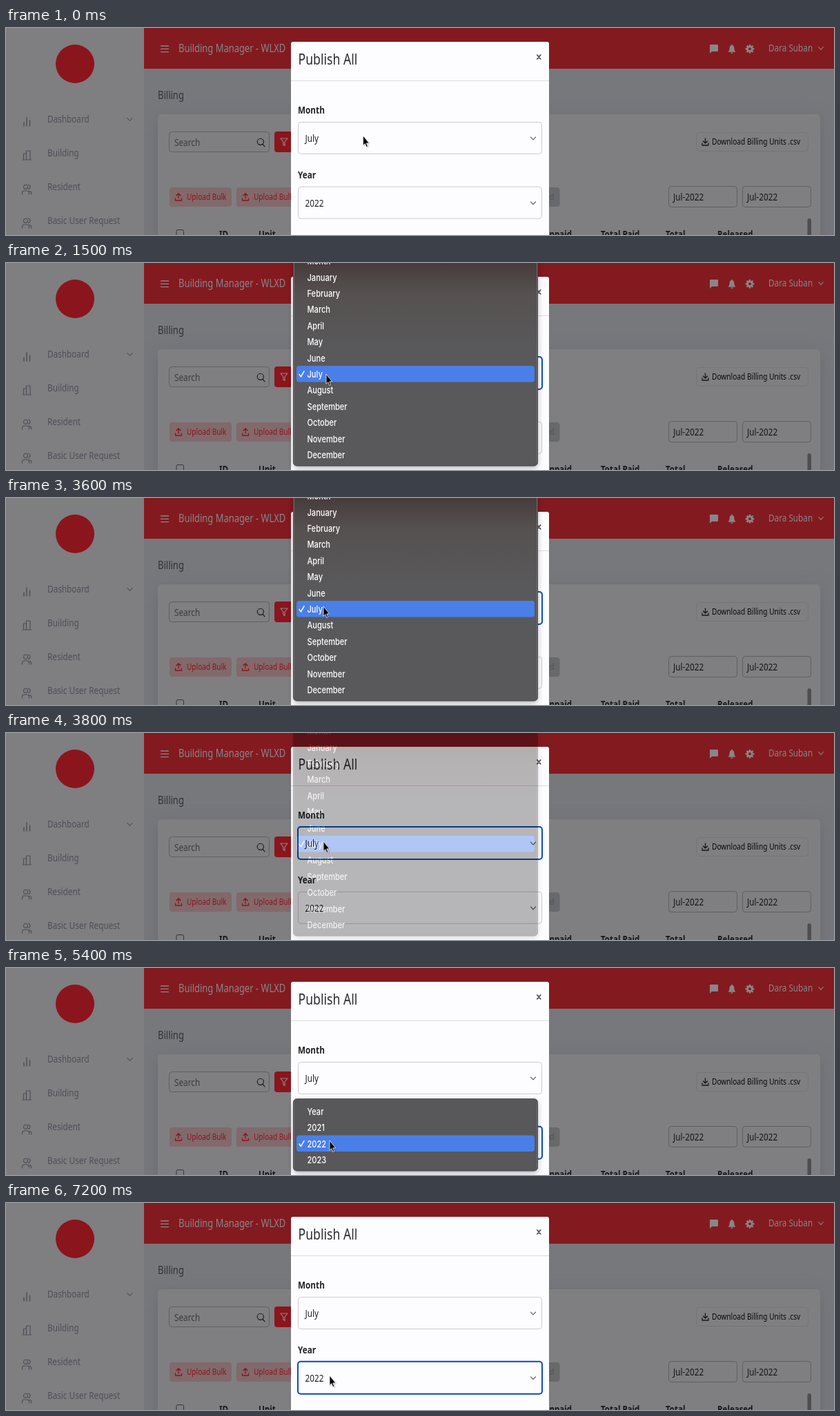
Animation of 1200 by 300 pixels, one loop 8000 ms. Source, as an HTML page:

```html
<!DOCTYPE html>
<html lang="en">
<head>
<meta charset="utf-8">
<title>Publish billing</title>
<style>
html, body { margin: 0; width: 100%; height: 100%; overflow: hidden; background: #7f7e81; }
svg { display: block; width: 100vw; height: 100vh; }
text { font-family: "Noto Sans", "Open Sans", sans-serif; white-space: pre; }
.labels text { font-family: Inter, Roboto, sans-serif; font-weight: 500; }
.line { fill: none; stroke-linecap: round; stroke-linejoin: round; }
/* a closing menu tints what lies below it */
.closing .back { mix-blend-mode: multiply; }
.closing .labels { mix-blend-mode: overlay; }
</style>
</head>
<body>
<svg id="stage" viewBox="0 0 1200 300" preserveAspectRatio="none">
  <defs>
    <linearGradient id="menuFill" gradientUnits="userSpaceOnUse" x1="0" y1="0" x2="0" y2="130">
      <stop offset="0" stop-color="#463c3b"/>
      <stop offset=".35" stop-color="#565151"/>
      <stop offset="1" stop-color="#59595b"/>
    </linearGradient>
    <filter id="soft" x="-10%" y="-30%" width="120%" height="160%"><feGaussianBlur stdDeviation="12"/></filter>
    <filter id="shade" x="-10%" y="-30%" width="120%" height="160%"><feGaussianBlur stdDeviation="5"/></filter>
    <filter id="dim" x="-40%" y="-40%" width="200%" height="200%"><feGaussianBlur stdDeviation="1"/></filter>
  </defs>
  <g id="page"></g>
  <g id="modal"></g>
  <g id="months"></g>
  <g id="years"></g>
  <g id="cursor">
    <path d="M.8 1.5V15.5L4 12.6 6 17.6 8.2 16.6 6.2 11.8H10Z" opacity=".3" filter="url(#dim)"/>
    <path d="M0 0V14.4L2.8 11.6 4.8 16.6 6.8 15.7 4.9 10.9H8.8Z" fill="#000" stroke="#fff" stroke-width=".8" stroke-linejoin="round"/>
  </g>
</svg>
<script>
const SQUEEZE = 0.84;   // the whole screen is narrowed by this ratio
const RED = '#8b151c', BAR = '#831a20', WHITE = '#7f7e81', LIGHT = '#898688';
const INK = '#16171a', MUTED = '#4e5059', PAPER = '#fdfcfe', BLUE = '#0f4fb3';
const LOOP = 8000, STEP = 100;
const ROW = 23.4, FIRST = 25.5;

const $ = id => document.getElementById(id);

const text = (x, y, str, size, fill, extra = '') =>
  `<text transform="translate(${x} ${y}) scale(${SQUEEZE} 1)" font-size="${size}" fill="${fill}" ${extra}>${str}</text>`;
const rect = (x, y, w, h, fill, r = 0, extra = '') =>
  `<rect x="${x}" y="${y}" width="${w}" height="${h}" rx="${r}" fill="${fill}" ${extra}/>`;
const box = (x, y, w, h, stroke, r = 4, fill = 'none') =>
  rect(x, y, w, h, fill, r, `stroke="${stroke}"`);
const line = (d, color, width = 1.2) =>
  `<path class="line" d="${d}" stroke="${color}" stroke-width="${width}"/>`;
const chevron = (x, y, color) => line(`M${x - 3.5} ${y - 1.8}l3.5 3.8 3.5-3.8`, color, 1.1);
const bold = 'font-weight="700"';
const endBold = bold + ' text-anchor="end"';

const people = y => line(
  `M23.5 ${y + 7}v-2q0-3 3-3h4q3 0 3 3v2M34 ${y + 2.3}q2.6.5 2.6 3v1.7M32.5 ${y - 7}q2.6.8 2.6 3.2t-2.6 3.2` +
  `M25.6 ${y - 3.8}a2.9 3.2 0 1 0 5.8 0a2.9 3.2 0 1 0-5.8 0`, MUTED);

const transfer = (x, y, color, up) => line(
  `M${x - 4.5} ${y + 2}v3h9v-3M${x} ${y + 2}v-7` +
  (up ? `M${x - 3} ${y - 2.2}l3-3 3 3` : `M${x - 3} ${y - 1}l3 3 3-3`), color, 1.3);

function gear(cx, cy) {
  let teeth = '';
  for (let i = 0; i < 8; i++)
    teeth += `<rect x="-1.2" y="-6.4" width="2.4" height="4" transform="translate(${cx} ${cy}) rotate(${i * 45})" fill="${LIGHT}"/>`;
  return teeth + `<circle cx="${cx}" cy="${cy}" r="3.4" fill="none" stroke="${LIGHT}" stroke-width="2.8"/>`;
}

function sidebar() {
  return rect(0, 0, 200, 300, WHITE) +
    `<circle cx="100" cy="52" r="28" fill="${RED}"/>` +
    line('M26 142v-5M30 142v-12M34.5 142v-8', MUTED, 1.5) +
    line('M24 191h12.5M25.5 191v-9h4M29.5 191v-13h5.5v13', MUTED) +
    people(234) + people(283) + chevron(179.5, 132.5, MUTED) +
    ['Dashboard', 'Building', 'Resident', 'Basic User Request']
      .map((s, i) => text(60, 137.3 + i * 48.9, s, 14, MUTED)).join('');
}

function header() {
  return rect(200, 0, 1000, 59, BAR) +
    line('M224.5 26h11M224.5 30.3h11M224.5 34.6h11', LIGHT, 1.3) +
    text(250, 34.8, 'Building Manager - WLXD', 15.4, LIGHT) +
    `<path d="M1021 24h10q1 0 1 1v8q0 1-1 1h-8l-3 3V25q0-1 1-1Z" fill="${LIGHT}"/>` +
    `<path d="M1047 34q1.7-1.6 1.7-5.2 0-3.2 2.6-3.8v-1.3h1.4V25q2.6.6 2.6 3.8 0 3.6 1.7 5.2v.8h-10ZM1050.3 35.6h3.4q-.3 1.7-1.7 1.7t-1.7-1.7Z" fill="${LIGHT}"/>` +
    gear(1078, 30.3) + text(1105, 34.3, 'Dara Suban', 14, LIGHT) + chevron(1181, 29.3, LIGHT);
}

function card() {
  const pink = '#82696b', edge = '#5e6065';
  const upload = x => rect(x, 231, 90, 28, pink, 4) + transfer(x + 13, 245, RED, true) +
    text(x + 25, 249.3, 'Upload Bulk', 12, RED);
  const date = x => box(x + .5, 229.5, 99, 30, edge) + text(x + 7, 250, 'Jul-2022', 14, INK);
  const heads = [[309, 'ID'], [366, 'Unit'], [862, 'Total Paid'], [956, 'Total'], [1031, 'Released']];
  return text(220, 103, 'Billing', 15.5, '#2f3135') +
    rect(220, 130, 960, 200, '#60646c', 5, 'filter="url(#soft)" opacity=".6"') +
    rect(220, 125, 960, 200, WHITE, 5) +
    box(236.5, 150.5, 145, 29, edge) + text(244, 170.5, 'Search', 14, '#3a3c42') +
    `<circle cx="368.8" cy="164.8" r="4.6" fill="none" stroke="${INK}" stroke-width="1.1"/>` +
    line('M372 168.3l3 3.6', INK, 1.1) +
    rect(389, 150, 60, 30, RED, 4) + line('M398 160h10l-4 5v5.5l-2.2-1.6v-3.9Z', LIGHT) +
    box(1000.5, 151.5, 162, 27, '#75757a') + transfer(1013.5, 165, INK, false) +
    text(1023, 169.3, 'Download Billing Units .csv', 12.1, '#0a0b0d', 'font-weight="500"') +
    upload(237) + upload(334) +
    rect(700, 231, 102.5, 28, '#68696c', 4) + text(794.5, 249.3, 'Published', 12, '#505257', 'text-anchor="end"') +
    date(960) + date(1067) +
    box(247, 292.5, 10.5, 12, '#35373b', 2) +
    heads.map(([x, s]) => text(x, 304, s, 13.7, INK, bold)).join('') +
    text(820, 304, 'Unpaid', 13.7, INK, endBold) +
    rect(1161.5, 276, 5.5, 40, '#4d4e51', 2.7);
}

function select(y, label, value, id) {
  return text(423, y - 12, label, 14, '#202226', bold) +
    box(423.5, y + .5, 353, 46, '#cbcbd0', 4, PAPER) +
    `<rect id="${id}" x="423" y="${y}" width="354" height="47" rx="4" fill="none" stroke="${BLUE}" stroke-width="2"/>` +
    text(433.5, y + 29, value, 14, '#202226') + chevron(764, y + 24, '#505256');
}

function modal() {
  return rect(413, 20, 374, 300, PAPER, 3) +
    text(423.5, 53, 'Publish All', 21, '#2b2d31') +
    line('M769.8 39l5 6M774.8 39l-5 6', '#3a3b3f', 1.5) +
    rect(413, 76, 374, 1, '#dcdbe0') +
    select(136, 'Month', 'July', 'monthFocus') + select(229.7, 'Year', '2022', 'yearFocus');
}

// Rows of both menus share one grid; the last row is number 11.
function menu(id, items, checked, fill) {
  const first = 12 - items.length, top = first < 0 ? -20 : FIRST + first * ROW - 23;
  const base = FIRST + checked * ROW;
  $(id).innerHTML = '<g class="back">' +
    rect(417, top + 3, 353, 294 - top, '#000', 5, 'filter="url(#shade)" opacity=".3"') +
    box(416.5, top, 354, 294 - top, '#48484a', 5, fill) +
    line(`M417.5 ${top + 5}V289M769.5 ${top + 5}V289`, '#747476', .8) +
    rect(421, 0, 345, 23.4, '#4a7fe8', 4, 'class="bar"') +
    '</g><g class="labels">' +
    line(`M425 ${base - 4.5}l2.4 3.5 4.6-8`, '#fff', 1.5) +
    items.map((s, i) => text(436.5, FIRST + (first + i) * ROW, s, 13.2, '#fff')).join('') + '</g>';
}

const MONTHS = ['Month', 'January', 'February', 'March', 'April', 'May', 'June', 'July',
  'August', 'September', 'October', 'November', 'December'];

$('page').innerHTML = rect(200, 0, 1000, 300, '#77787c') + card() + header() + sidebar();
$('modal').innerHTML = modal();
menu('months', MONTHS, 6, 'url(#menuFill)');
menu('years', ['Year', '2021', '2022', '2023'], 10, '#58585a');

// time, x, y of the pointer tip
const PATH = [
  [0, 517.5, 156], [200, 517.5, 156], [900, 464, 161], [2000, 464, 161], [2700, 461, 147],
  [3100, 461, 147], [3500, 460, 157], [3900, 460, 157], [4500, 469, 250], [LOOP, 469, 250]
];
const OPEN_MONTH = 1200, CLOSE_MONTH = 3600, OPEN_YEAR = 5100, CLOSE_YEAR = 6700;

function pointer(t) {
  const i = PATH.findIndex(p => p[0] > t);
  const [t0, x0, y0] = PATH[i - 1], [t1, x1, y1] = PATH[i];
  const u = (t - t0) / (t1 - t0), k = u * u * (3 - 2 * u);
  return [x0 + (x1 - x0) * k, y0 + (y1 - y0) * k];
}

const fade = (t, open, close) =>
  t < open ? 0 : Math.max(0, Math.min(1, 1 - (t - close) / 350));

function show(id, alpha, row) {
  const g = $(id);
  g.setAttribute('visibility', alpha > 0 ? 'visible' : 'hidden');
  g.classList.toggle('closing', alpha < 1);
  g.querySelector('.back').setAttribute('opacity', alpha);
  g.querySelector('.labels').setAttribute('opacity', Math.min(1, alpha * 2));
  g.querySelector('.bar').setAttribute('y', FIRST + row * ROW - 16.9);
}

function render(ms) {
  const t = Math.floor((ms % LOOP) / STEP) * STEP;
  const [x, y] = pointer(t);
  const hover = Math.floor((y - FIRST + 16.9) / ROW);
  show('months', fade(t, OPEN_MONTH, CLOSE_MONTH), Math.min(hover, 6));
  show('years', fade(t, OPEN_YEAR, CLOSE_YEAR), 10);
  $('monthFocus').setAttribute('visibility', t >= OPEN_MONTH && t < OPEN_YEAR ? 'visible' : 'hidden');
  $('yearFocus').setAttribute('visibility', t >= OPEN_YEAR ? 'visible' : 'hidden');
  $('cursor').setAttribute('transform', `translate(${x} ${y})`);
}

const start = performance.now();
function tick() {
  render(performance.now() - start);
  requestAnimationFrame(tick);
}
tick();
</script>
</body>
</html>
```
